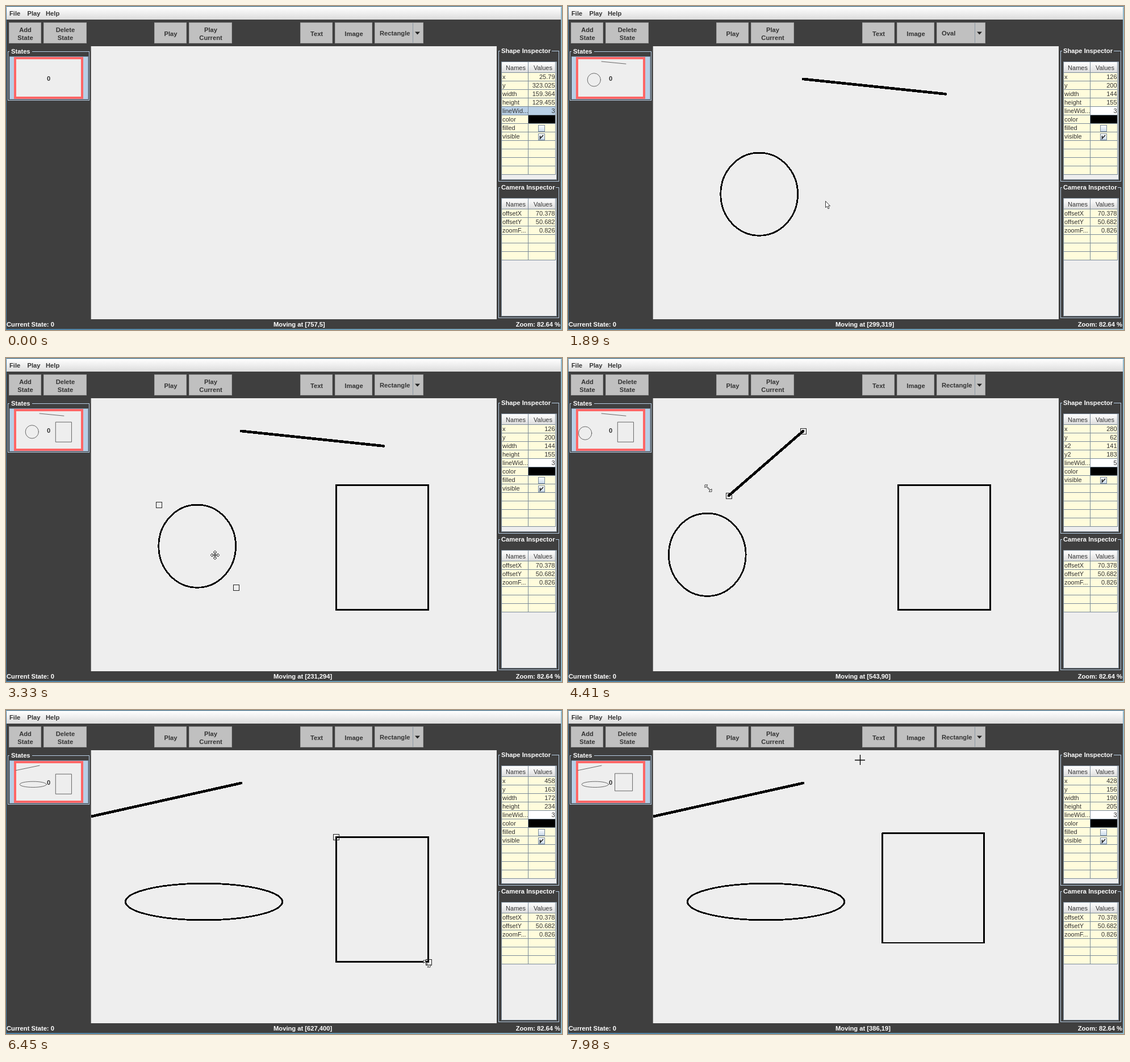
Recreate the animation shown at these times as an HTML page. Size 979 px wide and 572 px high, loop 8 s.

```html
<!DOCTYPE html>
<html lang="en">
<head>
<meta charset="utf-8">
<title>State editor</title>
<style>
html, body { margin: 0; width: 100%; height: 100%; overflow: hidden; background: #3f3f3f; }
svg { display: block; width: 979px; height: 572px; }
text { font: 11px "Liberation Sans", Arial, sans-serif; fill: #333; white-space: pre; }
.b { font-weight: bold; font-size: 11.2px; }
.w { fill: #fff; }
.m { text-anchor: middle; }
.e { text-anchor: end; }
.ink { fill: none; stroke: #000; stroke-linecap: round; stroke-linejoin: round; }
#shapes { shape-rendering: crispEdges; }
#mini * { vector-effect: non-scaling-stroke; stroke: #444; stroke-width: .8px; }
</style>
</head>
<body>
<svg viewBox="0 0 979 572">
  <defs>
    <linearGradient id="menu" x2="0" y2="1"><stop stop-color="#fff"/><stop offset="1" stop-color="#dcdcdc"/></linearGradient>
    <linearGradient id="edge"><stop stop-color="#4a7fa5"/><stop offset=".5" stop-color="#5f93ae"/><stop offset="1" stop-color="#8fb8cc"/></linearGradient>
    <linearGradient id="check" x2="0" y2="1"><stop stop-color="#fff"/><stop offset="1" stop-color="#c8d9ea"/></linearGradient>
    <clipPath id="stage"><rect x="150" y="71" width="714" height="482"/></clipPath>
    <clipPath id="card"><rect x="17" y="93" width="116" height="68"/></clipPath>
  </defs>
  <g id="frame"></g>
  <g id="combo"></g>
  <g clip-path="url(#card)"><g id="mini" class="ink" transform="translate(13.9 88.7) scale(.1613 .15)"></g></g>
  <text class="b m" x="75" y="132">0</text>
  <g clip-path="url(#stage)"><g id="shapes" class="ink" transform="translate(150 70.5) scale(.943)"></g></g>
  <g id="handles"></g>
  <g id="inspector"></g>
  <text id="status" class="b w" x="471" y="566"></text>
  <g id="cursor"></g>
</svg>
<script>
const LOOP = 8000, STEP = 30;
const CREAM = '#fffcdc', GRID = '#7a8a99', PALE = '#b8cfe5', DARK = '#3f3f3f';
const $ = id => document.getElementById(id);

// The pointer's script, in canvas units. Everything on screen follows from it.
const script = [];
const act = (mode, what, from, to, x, y) => script.push({ mode, what, from, to, end: [x, y] });
const go = (from, to, x, y, hover = '') => act('go', hover, from, to, x, y);
const pick = (tool, from, to) => act('pick', tool, from, to, 575, -25);

pick('Line', 120, 300);
go(390, 570, 280, 62);
act('draw', 'line', 720, 1020, 546, 90);
pick('Oval', 1050, 1250);
go(1350, 1440, 126, 200);
act('draw', 'oval', 1560, 1770, 270, 355);
pick('Rectangle', 1780, 2200);
go(2430, 2530, 457.5, 163);
act('draw', 'rect', 2550, 2850, 629.5, 397);
go(2880, 3240, 231, 294, 'oval');
act('drag', 'oval', 3400, 3700, 134, 310);
go(3720, 4170, 543, 90, 'line');
act('size', 'line', 4320, 4380, 141, 183);
act('size', 'line', 4380, 4500, -11, 127);
go(4680, 5070, 170, 371, 'oval');
act('size', 'oval', 5130, 5520, 279, 123);
act('size', 'oval', 5640, 5850, 322, 284.5);
go(5950, 6030, 177, 250, 'oval');
act('drag', 'oval', 6050, 6200, 212, 284);
go(6220, 6390, 627, 400, 'rect');
act('size', 'rect', 6560, 7000, 647.5, 368);
go(7020, 7170, 560, 270, 'rect');
act('drag', 'rect', 7200, 7450, 530.5, 263);
pick('Rectangle', 7560, 7740);
go(7850, 7950, 386, 19);

const ease = p => p * p * (3 - 2 * p);
const mix = (a, b, p) => a.map((v, i) => v + (b[i] - v) * p);

// Replays the script up to a time. Shapes are pairs of corners.
function replay(time) {
  const s = { pos: [757, 5], report: [757, 5], tool: 'Rectangle', kind: '', grip: '', look: 'none', shapes: {}, saved: {} };
  let armed = false, last = {};
  script.forEach((a, i) => {
    if (time < a.from) return;
    const free = a.mode === 'go' || a.mode === 'pick';
    const p = Math.min(1, (time - a.from) / (a.to - a.from));
    const start = s.pos, old = s.shapes[a.what];
    s.pos = mix(start, a.end, free ? ease(p) : p);
    if (free) {
      if (last.mode === 'pick') { s.tool = last.what; armed = true; }
      if (last.mode === 'draw') armed = false;
      s.saved = { ...s.shapes };
      s.report = s.pos.map(v => Math.max(0, Math.round(v)));
      s.grip = a.mode === 'go' && p === 1 ? a.what : '';
    } else {
      if (a.mode === 'draw') s.shapes[a.what] = [start, s.pos];
      if (a.mode === 'size') s.shapes[a.what] = [old[0], s.pos];
      if (a.mode === 'drag') s.shapes[a.what] = old.map(c => c.map((v, j) => v + s.pos[j] - start[j]));
    }
    if (s.grip || !free) s.kind = a.what;
    s.look = s.grip ? (free ? script[i + 1].mode : a.mode) : armed ? 'cross' : 'arrow';
    last = a;
  });
  return s;
}

function bounds([[x, y], [u, v]]) {
  return [Math.min(x, u), Math.min(y, v), Math.abs(u - x), Math.abs(v - y)];
}

const toStage = ([x, y]) => [Math.round(x * .943 + 150), Math.round(y * .943 + 70.5)];
const text = (x, y, s, cls = '') => `<text x="${x}" y="${y}" class="${cls}">${s}</text>`;
const rect = (x, y, w, h, fill, extra = '') =>
  `<rect x="${x}" y="${y}" width="${w}" height="${h}" fill="${fill}" ${extra}/>`;
const outline = (x, y, w, h, color) => rect(x + .5, y + .5, w - 1, h - 1, 'none', `stroke="${color}"`);

function drawing(shapes) {
  return Object.entries(shapes).map(([kind, ends]) => {
    if (kind === 'line') return `<path d="M${ends[0]}L${ends[1]}" stroke-width="5"/>`;
    const [x, y, w, h] = bounds(ends);
    if (kind === 'rect') return rect(x, y, w, h, 'none', 'stroke-width="3"');
    return `<ellipse cx="${x + w / 2}" cy="${y + h / 2}" rx="${w / 2}" ry="${h / 2}" stroke-width="3"/>`;
  }).join('');
}

function button(x, w, ...lines) {
  const y = lines.length > 1 ? 45.5 : 52.5;
  return rect(x, 29, w, 37, '#c0c0c0') + outline(x, 29, w, 37, '#a2a2a2') +
    lines.map((s, i) => text(x + w / 2 + .5, y + i * 14.5, s, 'b m')).join('');
}

const titled = (x, y, w, h, gap, title, inset = 5) => outline(x, y, w, h, PALE) +
  rect(x + 3, y - 2, gap, 5, DARK) + text(x + inset, y + 4, title, 'b w');

function tick(top, on) {
  return rect(937.5, top + 2.5, 11, 11, 'url(#check)', `stroke="${GRID}"`) +
    (on ? `<path d="M940.500 ${top + 6}v5l5.500 -6" stroke="#222" stroke-width="1.6" fill="none"/>` : '');
}

function table(y, rows, count) {
  const first = y + 20, tall = 20 + count * 15;
  let s = rect(872, y, 98, 209, '#eee') + outline(872, y, 98, 209, GRID) +
    rect(873, y + 1, 95, 19, 'url(#menu)') + text(897.5, y + 15, 'Names', 'm') + text(945.5, y + 15, 'Values', 'm');
  for (let i = 0; i < count; i++) {
    const top = first + i * 15, [name = '', value = '', bg = CREAM, valueBg = bg] = rows[i] || [];
    s += rect(873, top, 94, 15, bg) + rect(920, top, 47, 15, valueBg) + text(874, top + 11, name) +
      (typeof value === 'boolean' ? tick(top, value) : text(966.5, top + 11, value, 'e')) +
      rect(873, top + 14, 94, 1, GRID);
  }
  return s + rect(919, y, 1, tall, GRID) + rect(967, y, 1, tall, GRID) + rect(873, first - 1, 94, 1, GRID);
}

function inspector({ kind, shapes }) {
  const line = kind === 'line', ends = shapes[kind];
  const values = !kind ? ['25.79', '323.025', '159.364', '129.455']
    : (line ? ends.flat() : bounds(ends)).map(Math.round);
  const names = line ? ['x', 'y', 'x2', 'y2'] : ['x', 'y', 'width', 'height'];
  const rows = names.map((n, i) => [n, values[i]]);
  rows.push(['lineWid...', line ? 5 : 3, kind ? CREAM : PALE, kind ? '#fff' : PALE], ['color', '', CREAM, '#000']);
  if (!line) rows.push(['filled', false]);
  rows.push(['visible', true]);
  return table(98, rows, 12);
}

function handles({ grip, shapes }) {
  if (!grip) return '';
  const [x, y, w, h] = bounds(shapes[grip]);
  const ends = grip === 'line' ? shapes.line : [[x, y], [x + w, y + h]];
  return ends.map(toStage).map(([px, py]) => outline(px - 5, py - 5, 11, 11, '#222')).join('');
}

const tips = [0, 90, 180, 270].map(a => `<path d="M0 -8L3 -5H1V-2H-1V-5H-3Z" transform="rotate(${a})"/>`);
const glyphs = {
  none: '',
  arrow: '<path d="M.5 .5V12L3 9.5L5 14L7 13L5 9H8.5Z"/>',
  cross: '<path d="M-9 .5H9M.5 -9V9" stroke="#000" stroke-width="1.3"/>',
  drag: tips.join('') + '<path d="M-2 0H2M0 -2V2"/>',
  size: '<path d="M-6 -6H-1L-3 -4L4 3L6 1V6H1L3 4L-4 -3L-6 -1Z"/>'
};

function buildFrame() {
  $('frame').innerHTML =
    rect(0, 0, 979, 572, 'url(#edge)') + rect(0, 0, 979, 1, '#3d5f78') + rect(0, 1, 979, 1, '#bcd6e0') +
    rect(1, 2, 976, 568, DARK) + rect(1, 2, 976, 22, 'url(#menu)') +
    text(6, 17, 'File', 'b') + text(37.5, 17, 'Play', 'b') + text(70, 17, 'Help', 'b') +
    button(5, 57, 'Add', 'State') + button(66, 76, 'Delete', 'State') +
    button(261, 57, 'Play') + button(322, 76, 'Play', 'Current') +
    button(518, 57, 'Text') + button(579, 66, 'Image') + button(649, 86) +
    rect(716, 30, 1, 35, '#8b98a5') + '<path d="M720 45.500h9l-4.500 5z" fill="#222"/>' +
    rect(150, 71, 714, 482, '#eee') + rect(149, 71, 1, 482, '#777') +
    titled(3, 80, 144, 87, 40, 'States', 6) +
    rect(6, 89, 139, 76, PALE) + outline(6, 89, 139, 76, '#8aa3bd') +
    rect(14, 90, 122, 74, '#f66') + rect(18, 94, 114, 66, '#eee') +
    titled(867, 79, 107, 231, 91, 'Shape Inspector') +
    titled(867, 320, 107, 231, 98, 'Camera Inspector') +
    table(339, [['offsetX', '70.378'], ['offsetY', '50.682'], ['zoomF...', '0.826']], 6) +
    text(1, 566, 'Current State: 0', 'b w') + text(976, 566, 'Zoom: 82.64 %', 'b w e');
}

// The editor reacts one step behind the pointer.
function draw(t) {
  const app = replay(t - STEP), { pos, look } = replay(t);
  $('combo').innerHTML = text(658, 52, app.tool, 'b');
  $('shapes').innerHTML = drawing(app.shapes);
  $('mini').innerHTML = drawing(app.saved);
  $('handles').innerHTML = handles(app);
  $('inspector').innerHTML = inspector(app);
  $('status').textContent = `Moving at [${app.report}]`;
  $('cursor').innerHTML =
    `<g transform="translate(${toStage(pos)})" fill="#fff" stroke="#222" stroke-width=".9">${glyphs[look]}</g>`;
}

buildFrame();
const began = performance.now();
let shown = -1;
function loop() {
  const t = Math.floor((performance.now() - began) % LOOP / STEP) * STEP;
  if (t !== shown) draw(shown = t);
  requestAnimationFrame(loop);
}
loop();
</script>
</body>
</html>
```
